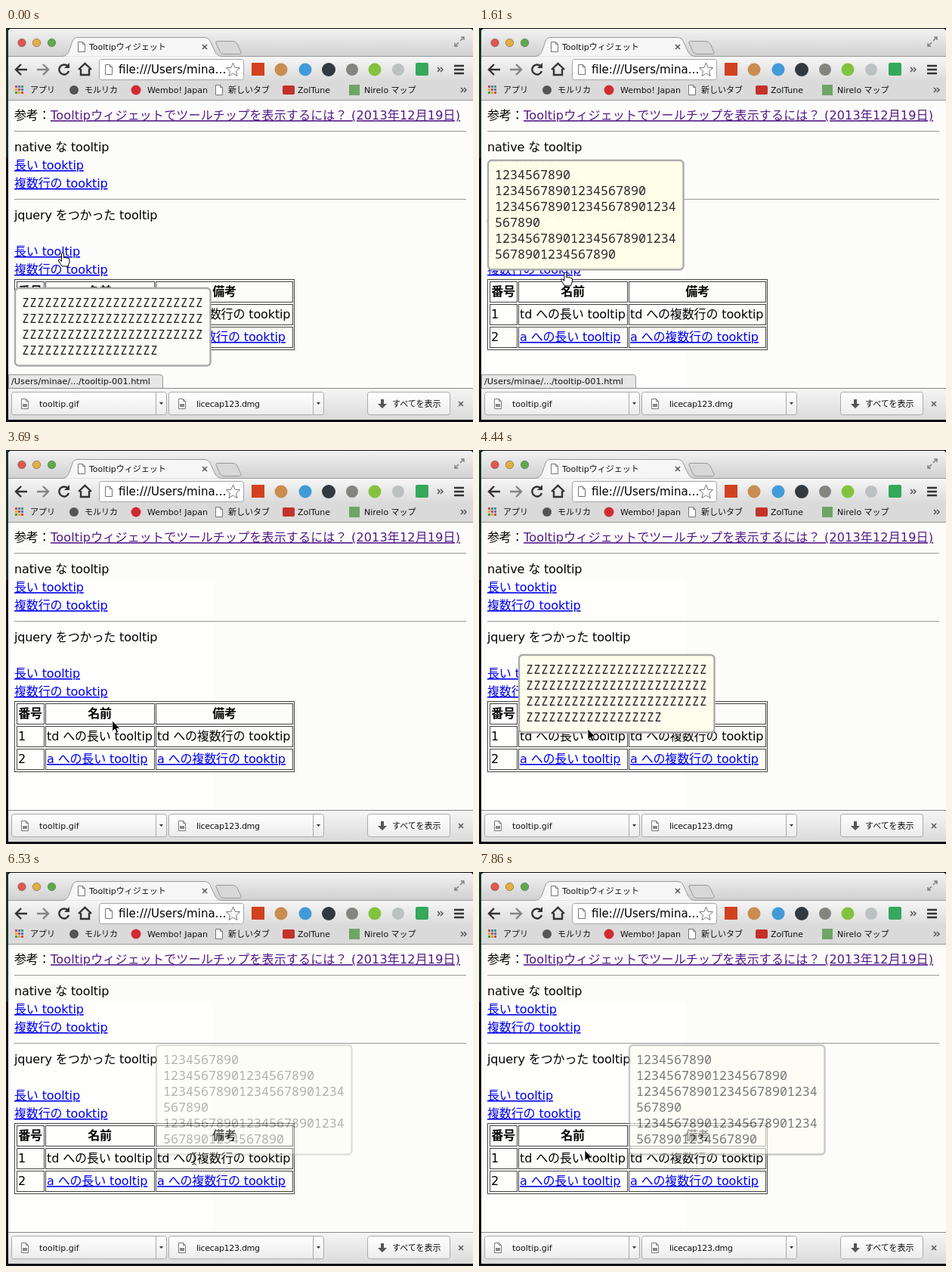
These frames come from a looping animation (618 by 521 pixels, 8000 ms). An HTML page:

```html
<!DOCTYPE html>
<html lang="ja">
<head>
<meta charset="utf-8">
<title>Tooltip</title>
<style>
html, body { margin: 0; width: 100%; height: 100%; overflow: hidden; background: #0d0b14; }
svg { display: block; width: 618px; height: 521px; }
text { font-family: "DejaVu Sans", "Noto Sans CJK JP", "Noto Sans CJK", sans-serif; white-space: pre; }
.ui { font-size: 11px; fill: #111; }
.page text { font-size: 16px; letter-spacing: -.13px; }
.page .head { letter-spacing: .17px; }
.link { fill: #0000ee; text-decoration: underline; }
.seen { fill: #551a8b; }
.th { font-weight: bold; text-anchor: middle; }
.tip text { font: 500 16.67px "Noto Sans Mono", monospace; fill: #222; }
.line { fill: none; stroke: #555; stroke-width: 1.5; }
.bold { fill: none; stroke: #333; stroke-width: 2.4; }
.cell { fill: none; stroke: #444; }
</style>
</head>
<body>
<svg viewBox="0 0 618 521">
  <defs>
    <linearGradient id="title" x2="0" y2="1"><stop stop-color="#f2f2f2"/><stop offset="1" stop-color="#d0d0d0"/></linearGradient>
    <linearGradient id="tools" x2="0" y2="1"><stop stop-color="#f6f6f6"/><stop offset="1" stop-color="#dadada"/></linearGradient>
    <linearGradient id="button" x2="0" y2="1"><stop stop-color="#ffffff"/><stop offset="1" stop-color="#ececec"/></linearGradient>
    <g id="sheet">
      <path d="M-4.5-6.5H1.5L4.5-3.5V6.5H-4.5Z" fill="#fff" stroke="#777"/>
      <path d="M1.5-6.5V-3.5H4.5" fill="none" stroke="#777"/>
    </g>
    <path id="cross" d="M-3-3L3 3M3-3L-3 3" class="line"/>
    <path id="more" d="M-4-3L-1 0L-4 3M0-3L3 0L0 3" class="line"/>
  </defs>

  <!-- window frame -->
  <rect width="618" height="521" fill="#0d0b14"/>
  <rect width="3" height="172" fill="#173427"/>
  <path d="M3 518V5Q3 1 8 1H613Q618 1 618 5V518Z" fill="#fcfcfa"/>
  <path d="M3 38V5Q3 1 8 1H613Q618 1 618 5V38Z" fill="url(#title)"/>
  <g stroke-width=".8" stroke="#555" stroke-opacity=".7">
    <circle cx="21" cy="19.500" r="5.200" fill="#e2574d"/>
    <circle cx="40.500" cy="19.500" r="5.200" fill="#e6ad40"/>
    <circle cx="60.500" cy="19.500" r="5.200" fill="#5cab48"/>
  </g>
  <path d="M3 37.500H74C80 37 82 34 84 29L88 17Q90 12.500 95 12.500H262Q268 12.500 270 17L276 30Q279 37.500 286 37.500H618" fill="#f6f6f6" stroke="#999"/>
  <path d="M280 17.500H300Q304 17.500 306 21L311 32Q312 34.500 308 34.500H289Q285 34.500 283 31L278 20Q277 17.500 280 17.500Z" fill="#d8d8d8" stroke="#999"/>
  <use href="#sheet" x="100" y="25"/>
  <text class="ui" x="110" y="29">Tooltipウィジェット</text>
  <use href="#cross" x="263" y="25"/>
  <path d="M601 17L606 12M602 12H606V16M599 19L594 24M594 20V24H598" class="line" stroke-opacity=".7"/>

  <!-- toolbar -->
  <rect x="3" y="38" width="615" height="33" fill="url(#tools)"/>
  <path d="M28 55H14M20 48L13 55L20 62" class="bold"/>
  <path d="M41 55H55M49 48L56 55L49 62" class="bold" stroke-opacity=".55"/>
  <path d="M82 51A6.500 6.500 0 1 0 83 57" class="bold"/><path d="M84 46V53H77Z" fill="#333"/>
  <path d="M96 55L104.500 47L113 55M99 54V62H110V54" class="bold"/>
  <rect x="123.500" y="41.500" width="191" height="27" rx="3" fill="#fff" stroke="#a5a5a5"/>
  <use href="#sheet" x="136" y="55"/>
  <text x="149" y="60" font-size="15">file:///Users/mina…</text>
  <path d="M300.500 46L303 52.300L309.500 52.700L304.500 57L306 63.500L300.500 60L295 63.500L296.500 57L291.500 52.700L298 52.300Z" fill="#fff" stroke="#777"/>
  <rect x="325" y="46" width="17" height="17" fill="#d2411f"/>
  <circle cx="364" cy="55" r="8.500" fill="#c98d50"/>
  <circle cx="396" cy="55" r="8.500" fill="#429bd8"/>
  <circle cx="427" cy="55" r="9" fill="#333940"/>
  <circle cx="458" cy="55" r="8" fill="#85857f"/>
  <circle cx="488" cy="55" r="8.500" fill="#83c23f"/>
  <circle cx="519" cy="55" r="8" fill="#bcc1c1"/>
  <rect x="542" y="46" width="17" height="17" rx="2" fill="#35a85b"/>
  <use href="#more" x="575" y="55"/>
  <path d="M593 50H606M593 55H606M593 60H606" class="bold"/>

  <!-- bookmarks -->
  <rect x="3" y="70" width="615" height="25" fill="#dadada"/>
  <path d="M3 95.500H618" stroke="#999"/>
  <g id="apps"></g>
  <circle cx="90" cy="82" r="6" fill="#555"/>
  <circle cx="172" cy="82" r="6.500" fill="#d12b32"/>
  <use href="#sheet" x="282" y="82"/>
  <rect x="366" y="76" width="16" height="12" rx="2" fill="#c3312b"/>
  <rect x="454" y="75" width="14" height="14" fill="#6ea565"/>
  <g class="ui">
    <text x="32" y="86">アプリ</text>
    <text x="104" y="86">モルリカ</text>
    <text x="187" y="86">Wembo! Japan</text>
    <text x="294" y="86">新しいタブ</text>
    <text x="386" y="86">ZolTune</text>
    <text x="474" y="86">Nirelo マップ</text>
  </g>
  <use href="#more" x="606" y="82"/>

  <!-- page -->
  <rect id="patch" x="3" width="271" fill="#fefefd"/>
  <g class="page">
    <path d="M11 136.500H609M11 226.500H609" stroke="#999"/>
    <text x="11" y="121">参考：</text>
    <text x="59" y="121" class="link seen head">Tooltipウィジェットでツールチップを表示するには？ (2013年12月19日)</text>
    <text x="11" y="163">native な tooltip</text>
    <text x="11" y="187" class="link">長い tooktip</text>
    <text x="11" y="211" class="link">複数行の tooktip</text>
    <text x="11" y="253">jquery をつかった tooltip</text>
    <text x="11" y="301" class="link">長い tooltip</text>
    <text x="11" y="325" class="link">複数行の tooktip</text>
    <rect x="11.500" y="332.500" width="370" height="93" class="cell"/>
    <g id="cells"></g>
    <text x="32" y="354" class="th">番号</text>
    <text x="124" y="354" class="th">名前</text>
    <text x="289" y="354" class="th">備考</text>
    <text x="16" y="384">1</text>
    <text x="54" y="384">td への長い tooltip</text>
    <text x="200" y="384">td への複数行の tooktip</text>
    <text x="16" y="414">2</text>
    <text x="54" y="414" class="link">a への長い tooltip</text>
    <text x="200" y="414" class="link">a への複数行の tooktip</text>
  </g>

  <g id="status">
    <path d="M3.500 476V458.500H204Q207.500 458.500 207.500 462V476" fill="#e6e6e6" stroke="#999"/>
    <text class="ui" x="7" y="471" style="font-size:11.3px">/Users/minae/.../tooltip-001.html</text>
  </g>

  <!-- download shelf -->
  <rect x="3" y="476" width="615" height="42" fill="url(#tools)"/>
  <path d="M3 476.500H618" stroke="#888"/>
  <g fill="url(#button)" stroke="#aaa">
    <rect x="7.500" y="481.500" width="205" height="30" rx="3"/>
    <rect x="215.500" y="481.500" width="205" height="30" rx="3"/>
    <rect x="478.500" y="481.500" width="109" height="30" rx="3"/>
    <path d="M198.500 482V511M406.500 482V511"/>
  </g>
  <path d="M203 495H208L205.500 498ZM411 495H416L413.500 498Z" fill="#333"/>
  <use href="#sheet" x="25" y="497"/><use href="#sheet" x="233" y="497"/>
  <path d="M22 497H28V501H22ZM230 497H236V501H230Z" fill="#888"/>
  <path d="M496 491H500V497H504L498 503L492 497H496Z" fill="#555"/>
  <g class="ui">
    <text x="44" y="501">tooltip.gif</text>
    <text x="252" y="501" style="letter-spacing:-.3px">licecap123.dmg</text>
    <text x="511" y="501">すべてを表示</text>
  </g>
  <use href="#cross" x="602" y="497"/>

  <g id="tips"></g>

  <g id="cursor">
    <path id="arrow" d="M0 0V14L3.300 11L5.700 16.300L8 15.300L5.700 10.200H10Z" fill="#000" stroke="#fff" stroke-width=".8"/>
    <path id="hand" d="M-1.500 0Q0-1.500 1.500 0V6Q3 4.500 4.500 6Q6 5 7 6.500Q9 6 9 8V12L7 17H-1L-5.500 10Q-6 7.500-4 8L-1.500 10.500Z" fill="#fff" stroke="#000"/>
    <path id="beam" d="M-3-8Q0-8 0-6Q0-8 3-8M0-6V6M-3 8Q0 8 0 6Q0 8 3 8M-1.500 3H1.500" fill="none" stroke="#222"/>
  </g>
</svg>
<script>
const LOOP = 8000;
const byId = id => document.getElementById(id);
const show = (id, on) => byId(id).setAttribute('visibility', on ? 'visible' : 'hidden');

const dotColors = ['#d9483b', '#3d7dd8', '#3f9e4d', '#e0a930'];
byId('apps').innerHTML = Array.from({ length: 9 }, (_, i) =>
  `<rect x="${12 + i % 3 * 4}" y="${76 + Math.floor(i / 3) * 4}" width="3" height="3" fill="${dotColors[i % 4]}"/>`).join('');

const columns = [[14, 36], [52, 144], [198, 181]];
byId('cells').innerHTML = [335, 365, 395].map(y => columns.map(([x, w]) =>
  `<rect x="${x + .5}" y="${y + .5}" width="${w}" height="27" class="cell"/>`).join('')).join('');

const digits = n => '1234567890'.repeat(5).slice(0, n);
const longText = [24, 24, 24, 18].map(n => 'Z'.repeat(n));
const multiText = [digits(10), digits(20), digits(24), '567890', digits(24), '5678901234567890'];

// fade: pairs of time and opacity
const tips = [
  { x: 11, y: 343, lines: longText, fill: '#fcfcf8', fade: [[640, 1], [890, .42], [1070, 0]] },
  { x: 11, y: 174, lines: multiText, fill: '#ffffe9', fade: [[1190, 0], [1620, 1], [2900, 1], [3390, 0]] },
  { x: 52, y: 270, lines: longText, fill: '#fefeee', fade: [[3930, 0], [4400, 1], [5330, 1], [5810, 0]] },
  { x: 198, y: 228, lines: multiText, fill: '#fffff4', fade: [[6390, 0], [6770, 1], [7600, 1], [8270, 0]] }
];

for (const tip of tips) {
  const g = document.createElementNS('http://www.w3.org/2000/svg', 'g');
  g.setAttribute('class', 'tip');
  g.setAttribute('transform', `translate(${tip.x} ${tip.y})`);
  g.innerHTML = `<rect x="1" y="1" width="258.500" height="${tip.lines.length * 21 + 18.5}" rx="5" fill="${tip.fill}" stroke="#aaa" stroke-width="2.400"/>`
    + tip.lines.map((s, i) => `<text x="10" y="${26 + i * 21}">${s}</text>`).join('');
  byId('tips').append(g);
  tip.node = g;
}

const path = [
  [600, 75, 298], [740, 112, 293], [890, 148, 291], [1040, 138, 308], [1190, 118, 321], [1760, 113, 325],
  [2800, 113, 325], [3100, 134, 346], [3690, 143, 362], [4000, 144, 369], [5490, 144, 369],
  [5900, 285, 252], [6090, 350, 290], [6370, 256, 370], [6510, 249, 379],
  [7562, 249, 379], [7850, 140, 368]
];

function track(keys, t, k = 1) {
  const i = keys.findIndex(key => key[0] > t);
  if (i === 0) return keys[0][k];
  if (i < 0) return keys[keys.length - 1][k];
  const a = keys[i - 1], b = keys[i];
  return a[k] + (b[k] - a[k]) * (t - a[0]) / (b[0] - a[0]);
}

function sample(t) {
  const [from, step] = t < 2800 ? [600, 144.3] : [2800, 148.8];
  return t < 600 ? 0 : from + Math.floor((t - from) / step) * step;
}

function draw() {
  const t = sample(performance.now() % LOOP);
  for (const tip of tips) tip.node.setAttribute('opacity', track(tip.fade, t));
  byId('cursor').setAttribute('transform', `translate(${track(path, t)} ${track(path, t, 2)})`);
  const hand = t < 700 || (t > 1150 && t < 2900);
  const beam = t > 6360 && t < 7600;
  show('hand', hand);
  show('beam', beam);
  show('arrow', !hand && !beam);
  show('status', t < 3350);
  const top = t < 1300 ? 288 : 171;
  show('patch', t > 0);
  byId('patch').setAttribute('y', top);
  byId('patch').setAttribute('height', 476 - top);
  requestAnimationFrame(draw);
}
draw();
</script>
</body>
</html>
```
